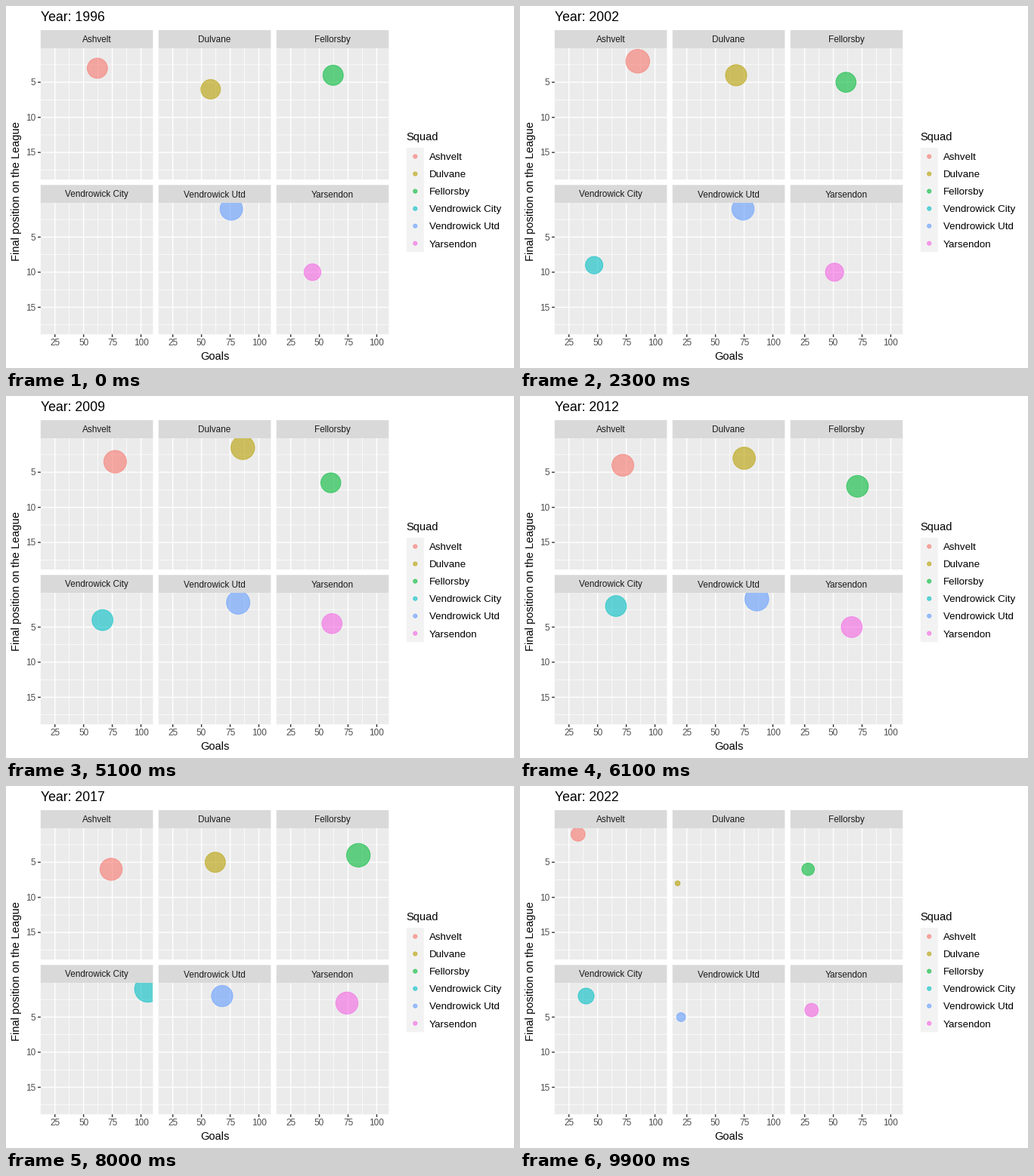
A matplotlib script for the animation above (10000 ms loop, 672 by 480 pixels).

```python
import matplotlib.pyplot as plt
import numpy as np
from matplotlib.animation import FuncAnimation
from matplotlib.collections import LineCollection
from matplotlib.patches import Circle, Rectangle

plt.rcParams["font.family"] = "Liberation Sans"

W, H, DPI = 672, 480, 96
FRAMES, INTERVAL = 100, 100
FIRST, LAST = 1996, 2022

# Panel layout in pixels
LEFTS = [45.8, 201.75, 357.7]
TOPS = [56.0, 261.3]
PANEL_W, PANEL_H, STRIP_H = 148.6, 174.0, 24.0
X_MIN, X_MAX = 12.55, 110.45
Y_MIN, Y_MAX = 0.15, 18.85
TICK = 3.67
MAJOR, MINOR = 1.42, 0.71
ALPHA = 0.6

fig = plt.figure(figsize=(W / DPI, H / DPI), dpi=DPI, facecolor="white")
ax = fig.add_axes([0, 0, 1, 1])
ax.set_xlim(0, W)
ax.set_ylim(H, 0)
ax.axis("off")


def px(width):
    return width * 72 / DPI


def x_off(goals):
    return (goals - X_MIN) / (X_MAX - X_MIN) * PANEL_W


def y_off(rank):
    return (rank - Y_MIN) / (Y_MAX - Y_MIN) * PANEL_H


def dot_radius(size):
    return 0.5 * (size * 2.845 + 0.945)


def bubble_size(goals):
    return 2 + 10 * np.sqrt((goals - 17) / 89)


def box(x, y, w, h, color):
    return ax.add_patch(Rectangle((x, y), w, h, fc=color, lw=0, snap=False, zorder=1))


def lines(segments, color, width, z):
    group = LineCollection(segments, colors=color, linewidths=px(width), zorder=z)
    group.set_snap(False)
    ax.add_collection(group, autolim=False)


def label(x, y, text, size, color="black", ha="left", **kw):
    return ax.text(x, y, text, fontsize=size, color=color, ha=ha,
                   va="baseline", zorder=6, **kw)


def dot(x, y, r, color):
    shade = plt.matplotlib.colors.to_rgba(color, ALPHA)
    return ax.add_patch(Circle((x, y), r, fc=shade, ec=shade, lw=px(0.945), zorder=4))


def draw_panel(left, top, name):
    box(left, top - STRIP_H, PANEL_W, STRIP_H, "#D9D9D9")
    label(left + PANEL_W / 2, top - 7.8, name, 8.8, "#1A1A1A", "center")
    panel = box(left, top, PANEL_W, PANEL_H, "#EBEBEB")
    right, bottom = left + PANEL_W, top + PANEL_H
    grids = [([37.5, 62.5, 87.5], [2.5, 7.5, 12.5, 17.5], MINOR, 2),
             ([25, 50, 75, 100], [5, 10, 15], MAJOR, 3)]
    for xs, ys, width, z in grids:
        cols = [[(left + x_off(v), top), (left + x_off(v), bottom)] for v in xs]
        rows = [[(left, top + y_off(v)), (right, top + y_off(v))] for v in ys]
        lines(rows + cols, "white", width, z)
    return panel


def draw_axes():
    ticks = []
    for top in TOPS:
        for v in (5, 10, 15):
            y = top + y_off(v)
            ticks.append([(LEFTS[0] - TICK, y), (LEFTS[0], y)])
            label(LEFTS[0] - 6.6, y + 4.2, str(v), 8.8, "#4D4D4D", "right")
    base = TOPS[1] + PANEL_H
    for left in LEFTS:
        for v in (25, 50, 75, 100):
            x = left + x_off(v)
            ticks.append([(x, base), (x, base + TICK)])
            label(x, base + 15.2, str(v), 8.8, "#4D4D4D", "center")
    lines(ticks, "#333333", MAJOR, 5)
    label((LEFTS[0] + LEFTS[2] + PANEL_W) / 2, 469, "Goals", 11, ha="center")
    label(18, (TOPS[0] + base) / 2, "Final position on the League", 11,
          ha="center", rotation=90, rotation_mode="anchor")


# Frame at which each season's values are reached
KEYS = [round(1 + (FRAMES - 1) * k / (LAST - FIRST)) - 1 for k in range(LAST - FIRST + 1)]


class Squad:
    count = 0

    def __init__(self, name, color, goals, ranks, keys=KEYS, start=0):
        slot = Squad.count
        Squad.count += 1
        self.left, self.top = LEFTS[slot % 3], TOPS[slot // 3]
        self.keys, self.start = keys, start
        self.goals, self.ranks = np.array(goals), np.array(ranks)
        self.sizes = bubble_size(self.goals)
        panel = draw_panel(self.left, self.top, name)
        self.dot = dot(0, 0, 1, color)
        self.dot.set_clip_path(panel)

        y = 188 + 23.04 * slot
        box(529.8, y, 23.04, 23.04, "#F2F2F2")
        dot(541.3, y + 11.52, dot_radius(1.5), color)
        label(560.1, y + 16.3, name, 10)

    def move(self, i):
        goals, rank, size = (np.interp(i, self.keys, v)
                             for v in (self.goals, self.ranks, self.sizes))
        self.dot.center = self.left + x_off(goals), self.top + y_off(rank)
        self.dot.set_radius(dot_radius(size))
        self.dot.set_visible(i >= self.start)


ashvelt = Squad(
    "Ashvelt", "#F8766D",
    [62, 68, 59, 73, 63, 79, 85, 73, 87, 68, 63, 74, 68, 83,
     72, 74, 72, 68, 71, 65, 77, 74, 73, 56, 55, 61, 33],
    [3, 1, 2, 2, 2, 1, 2, 1, 2, 4, 4, 3, 4, 3,
     4, 3, 4, 4, 3, 2, 5, 6, 5, 8, 8, 5, 1])

dulvane = Squad(
    "Dulvane", "#B79F00",
    [58, 71, 57, 53, 68, 66, 68, 67, 72, 72, 64, 65, 68, 103,
     69, 65, 75, 71, 73, 59, 85, 62, 63, 69, 58, 76, 17],
    [6, 4, 3, 5, 6, 6, 4, 2, 1, 1, 2, 2, 3, 1,
     2, 6, 3, 3, 1, 10, 1, 5, 3, 4, 4, 3, 8])

fellorsby = Squad(
    "Fellorsby", "#00BA38",
    [62, 68, 68, 51, 71, 67, 61, 55, 52, 57, 57, 67, 77, 61,
     59, 47, 71, 101, 52, 63, 78, 84, 89, 85, 68, 94, 28],
    [4, 3, 7, 4, 3, 2, 5, 4, 5, 3, 3, 4, 2, 7,
     6, 8, 7, 2, 6, 8, 4, 4, 2, 1, 3, 2, 6])

# Joins in 2000 and skips 2001
city = Squad(
    "Vendrowick City", "#00BFC4",
    [41, 47, 55, 47, 43, 29, 45, 58, 73, 60, 93,
     66, 102, 83, 71, 80, 106, 95, 102, 83, 99, 40],
    [18, 9, 16, 8, 15, 14, 9, 10, 5, 3, 1,
     2, 1, 2, 4, 3, 1, 1, 2, 1, 1, 2],
    keys=[KEYS[4] - 1] + KEYS[6:], start=KEYS[4])

united = Squad(
    "Vendrowick Utd", "#619CFF",
    [76, 73, 80, 97, 79, 87, 74, 64, 58, 72, 83, 80, 68, 86,
     78, 89, 86, 64, 62, 49, 54, 68, 65, 66, 73, 57, 20],
    [1, 2, 1, 1, 1, 3, 1, 3, 3, 2, 1, 1, 1, 2,
     1, 2, 1, 7, 4, 5, 6, 2, 6, 3, 2, 6, 5])

yarsendon = Squad(
    "Yarsendon", "#F564E3",
    [44, 44, 47, 57, 47, 49, 51, 47, 47, 53, 57, 66, 45, 67,
     55, 66, 66, 55, 58, 69, 86, 74, 67, 61, 68, 69, 31],
    [10, 14, 11, 10, 12, 9, 10, 14, 9, 5, 5, 11, 8, 4,
     5, 4, 5, 6, 5, 3, 2, 3, 4, 6, 7, 4, 4])

squads = [ashvelt, dulvane, fellorsby, city, united, yarsendon]

draw_axes()
label(529.8, 178, "Squad", 11)
title = label(LEFTS[0], 19.8, "", 13.2)


def update(i):
    year = round(FIRST + (LAST - FIRST) * i / (FRAMES - 1))
    title.set_text(f"Year: {year}")
    for squad in squads:
        squad.move(i)
    return [title] + [squad.dot for squad in squads]


anim = FuncAnimation(fig, update, frames=FRAMES, interval=INTERVAL,
                     repeat=True, repeat_delay=0)
plt.show()
```
